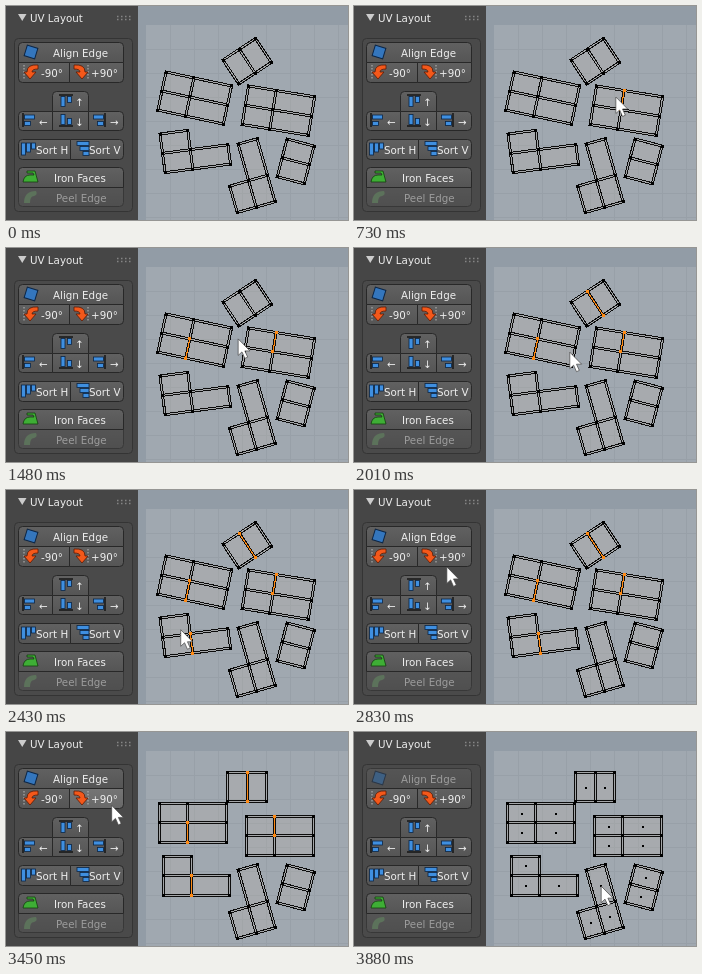
Write an HTML page that moves like this. It is 342 px wide and 214 px high and loops after 3.91 s.

```html
<!DOCTYPE html>
<html lang="en">
<head>
<meta charset="utf-8">
<title>UV Layout</title>
<style>
html, body { margin: 0; width: 100%; height: 100%; overflow: hidden; background: #464646; }
svg { display: block; width: 342px; height: 214px; }
text { font: 10.3px "DejaVu Sans", sans-serif; fill: #eee; }
</style>
</head>
<body>
<svg viewBox="0 0 342 214">
  <defs>
    <linearGradient id="normal" x2="0" y2="1"><stop stop-color="#616161"/><stop offset="1" stop-color="#555"/></linearGradient>
    <linearGradient id="hover" x2="0" y2="1"><stop stop-color="#757575"/><stop offset="1" stop-color="#686868"/></linearGradient>
    <g id="turn">
      <path d="M-7 -7V7" stroke="#bbb" stroke-dasharray="1.5 1.5"/>
      <path d="M7 -7Q-4 -8 -4 0H-7L-1 7L5 0H1Q1 -3 7 -3Z" fill="#f4581a" stroke="#5e1a05" stroke-width=".8"/>
    </g>
    <g id="bars" stroke="#0b2545" stroke-width=".8">
      <path d="M-7 -6H7" stroke="#111" stroke-width="1.4"/>
      <rect x="-5" y="-4.500" width="4" height="10" fill="#3f8fe0"/>
      <rect x="1.500" y="-4.500" width="4" height="6" fill="#3f8fe0"/>
    </g>
    <g id="steps" fill="#3f8fe0" stroke="#0b2545" stroke-width=".8">
      <rect x="-7.500" y="-6" width="4" height="12"/><rect x="-2.500" y="-6" width="4" height="9"/><rect x="2.500" y="-6" width="4" height="6"/>
    </g>
  </defs>
  <rect width="342" height="214" fill="#929ca6"/>
  <rect x="140" y="19" width="202" height="195" fill="#a0a8b0"/>
  <path id="grid" fill="none" stroke="#98a0a8"/>
  <g id="islands" shape-rendering="crispEdges"></g>

  <rect width="132" height="214" fill="#464646"/>
  <g transform="translate(0 -1)">
    <path d="M12 9H20.500L16.250 16Z" fill="#ccc"/>
    <text x="24" y="17">UV Layout</text>
    <path d="M111 11.500H127M111 14.500H127" stroke="#858585" stroke-width="1.500" stroke-dasharray="1.500 2.500"/>
    <rect x="8.500" y="33.500" width="118" height="173" rx="4" fill="#4a4a4a" stroke="#343434"/>
    <g id="buttons"></g>
  </g>
  <path id="cursor" d="M0 0V16.500L3.800 13L6.700 19.500L9.500 18.200L6.700 12H11.800Z" fill="#fff" stroke="#444" stroke-width=".7"/>
</svg>
<script>
const LOOP = 3910, ALIGN = 3260, FACE_MODE = 3850;
const $ = id => document.getElementById(id);

// x, y, width, height, label, label x, icon, rounded corners (tl tr br bl), disabled
const buttons = [
  [13, 37, 105, 20, 'Align Edge', 47, '<rect x="-5.5" y="-5.5" width="11" height="11" transform="translate(25 47) rotate(17)" fill="#3476bd" stroke="#0c2544"/>', '1100'],
  [13, 57, 51, 20, '-90°', 35, use('turn', 25, 67), '0001'],
  [64, 57, 54, 20, '+90°', 85, use('turn', 75, 67, 'scale(-1 1)'), '0010'],
  [47, 86, 36, 20, '↑', 69, use('bars', 60, 96), '1100'],
  [13, 106, 34, 19, '←', 33, use('bars', 23, 115, 'rotate(-90) scale(-1 1)'), '1001'],
  [47, 106, 36, 19, '↓', 69, use('bars', 60, 115, 'scale(1 -1)'), '0000'],
  [83, 106, 35, 19, '→', 104, use('bars', 93, 115, 'rotate(90)'), '0110'],
  [13, 134, 52, 20, 'Sort H', 30, use('steps', 23, 144), '1001'],
  [65, 134, 53, 20, 'Sort V', 83, use('steps', 77, 144, 'rotate(90) scale(1 -1) rotate(180) scale(-1 1)'), '0110'],
  [13, 162, 105, 20, 'Iron Faces', 48, '<path d="M17 177Q18 170 24 170H28L27 168H21V166H29L32 177Z" fill="#3eae35" stroke="#123e0e" stroke-width=".8"/>', '1100'],
  [13, 182, 105, 19, 'Peel Edge', 50, '<path d="M18 198Q18 186 30 186Q32 190 28 191Q24 191 24 198Z" fill="#6f9a6c"/>', '0011', true]
];

// origin, angle, column and row offsets, cells, first row of the picked edge, click time
const islands = [
  { at: [217, 54], angle: -33.5, cols: [0, 19.5, 39], rows: [0, 28.7], cells: '00 10', sel: 0, click: 1740 },
  { at: [160, 66], angle: 12, cols: [0, 28.5, 67], rows: [0, 19.5, 39], cells: '00 10 01 11', sel: 1, click: 1210 },
  { at: [242.5, 80], angle: 9.3, cols: [0, 28, 67], rows: [0, 19.5, 39], cells: '00 10 01 11', sel: 0, click: 660 },
  { at: [154, 128], angle: -7.5, cols: [0, 28, 66], rows: [0, 19.5, 39], cells: '00 01 11', sel: 1, click: 2340 },
  { at: [213.2, 143.6], angle: -16, cols: [0, 19.7, 39.4], rows: [0, 38, 65.5], cells: '10 01 11' },
  { at: [281, 133], angle: 14.5, cols: [0, 28], rows: [0, 19.5, 39], cells: '00 01' }
];

// time, x, y of the pointer tip
const path = [
  [0, 342, 216], [270, 305, 148], [530, 281, 98], [650, 268, 92], [730, 262, 91], [910, 228, 94],
  [1090, 192, 98], [1210, 182, 103], [1340, 200, 100], [1480, 232, 91], [1620, 248, 72],
  [1740, 244, 57], [1860, 237, 71], [2010, 216, 104], [2170, 176, 133], [2340, 182, 147],
  [2500, 165, 130], [2730, 120, 92], [2830, 93, 77], [3000, 75, 63], [3170, 66, 52],
  [3290, 66, 50], [3400, 84, 60], [3600, 180, 119], [3760, 243, 151], [3850, 247, 154], [3910, 247, 154]
];

function use(id, x, y, extra = '') {
  return `<use href="#${id}" transform="translate(${x} ${y}) ${extra}"/>`;
}

function roundRect(x, y, w, h, corners) {
  const [a, b, c, d] = [...corners].map(k => k * 4);
  return `M${x + a} ${y}H${x + w - b}q${b} 0 ${b} ${b}V${y + h - c}q0 ${c} ${-c} ${c}` +
    `H${x + d}q${-d} 0 ${-d} ${-d}V${y + a}q0 ${-a} ${a} ${-a}Z`;
}

function pointer(t) {
  let i = 0;
  while (i < path.length - 2 && path[i + 1][0] <= t) i++;
  const a = path[i], b = path[i + 1], span = b[0] - a[0], u = (t - a[0]) / span;
  const slope = (k, axis) => {
    const p = path[Math.max(k - 1, 0)], n = path[Math.min(k + 1, path.length - 1)];
    return (n[axis] - p[axis]) / (n[0] - p[0]) * span;
  };
  return [1, 2].map(k => {
    const m = slope(i, k), n = slope(i + 1, k), d = b[k] - a[k];
    return a[k] + u * (m + u * (3 * d - 2 * m - n + u * (m + n - 2 * d)));
  });
}

// Maps island offsets to the stage; an aligned island turns about the middle of its picked edge.
function placement(s, aligned) {
  const angle = s.angle * Math.PI / 180, cos = Math.cos(angle), sin = Math.sin(angle);
  const tilted = (x, y) => [s.at[0] + x * cos - y * sin, s.at[1] + x * sin + y * cos];
  if (!aligned) return tilted;
  const px = s.cols[1], py = (s.rows[s.sel] + s.rows[s.sel + 1]) / 2;
  const [cx, cy] = tilted(px, py);
  return (x, y) => [Math.floor(cx + x - px) + .5, Math.floor(cy + y - py) + .5];
}

function drawIsland(s, t) {
  const place = placement(s, s.click && t >= ALIGN);
  const node = (c, r) => place(s.cols[c], s.rows[r]);
  const dot = ([x, y], size, color) =>
    `<rect x="${Math.round(x - size / 2)}" y="${Math.round(y - size / 2)}" width="${size}" height="${size}" fill="${color}"/>`;
  const nodes = new Map();
  let outline = '', centers = '';
  for (const cell of s.cells.split(' ')) {
    const [c, r] = [...cell].map(Number);
    const corners = [[c, r], [c + 1, r], [c + 1, r + 1], [c, r + 1]];
    corners.forEach(k => nodes.set(k.join(), node(...k)));
    outline += 'M' + corners.map(k => node(...k).join(' ')).join('L') + 'Z';
    centers += dot(place((s.cols[c] + s.cols[c + 1]) / 2, (s.rows[r] + s.rows[r + 1]) / 2), 2, '#000');
  }
  let out = `<path d="${outline}" fill="#b5b0a8" fill-opacity=".3" stroke="#0c0c0c" stroke-width="3"/>` +
    `<path d="${outline}" fill="none" stroke="#a4a6a8"/>`;
  for (const p of nodes.values()) out += dot(p, 3, '#000');
  if (t >= s.click && t < FACE_MODE) {
    const ends = [node(1, s.sel), node(1, s.sel + 1)];
    out += `<path d="M${ends.map(p => p.join(' ')).join('L')}" stroke="#ff8a14" stroke-width="1.2"/>`;
    out += ends.map(p => dot(p, 3, '#ff8a14')).join('');
  }
  return t >= FACE_MODE ? out + centers : out;
}

let grid = '';
for (let d = 24; d < 200; d += 24) grid += `M${140.5 + d} 19V214M140 ${19.5 + d}H342`;
$('grid').setAttribute('d', grid);

$('buttons').innerHTML = buttons.map(([x, y, w, h, label, tx, icon, corners, off]) =>
  `<g opacity="${off ? .5 : 1}"><path d="${roundRect(x - .5, y + .5, w, h, corners)}" stroke="#282828"/>` +
  `${icon}<text x="${tx}" y="${y + 14.5}">${label}</text></g>`).join('');
const buttonNodes = [...$('buttons').children];

let drawn = '';
function render(t) {
  const [x, y] = pointer(t);
  $('cursor').setAttribute('transform', `translate(${x} ${y})`);
  buttons.forEach(([bx, by, w, h, , , , , off], i) => {
    const over = !off && x >= bx && x < bx + w && y + 1 >= by && y + 1 < by + h;
    buttonNodes[i].firstChild.setAttribute('fill', `url(#${over ? 'hover' : 'normal'})`);
  });
  buttonNodes[0].setAttribute('opacity', t >= FACE_MODE ? .5 : 1);
  const state = islands.map(s => t >= s.click).join() + (t >= ALIGN) + (t >= FACE_MODE);
  if (state !== drawn) {
    $('islands').innerHTML = islands.map(s => drawIsland(s, t)).join('');
    drawn = state;
  }
}

const start = performance.now();
function tick() {
  render((performance.now() - start) % LOOP);
  requestAnimationFrame(tick);
}
tick();
</script>
</body>
</html>
```
